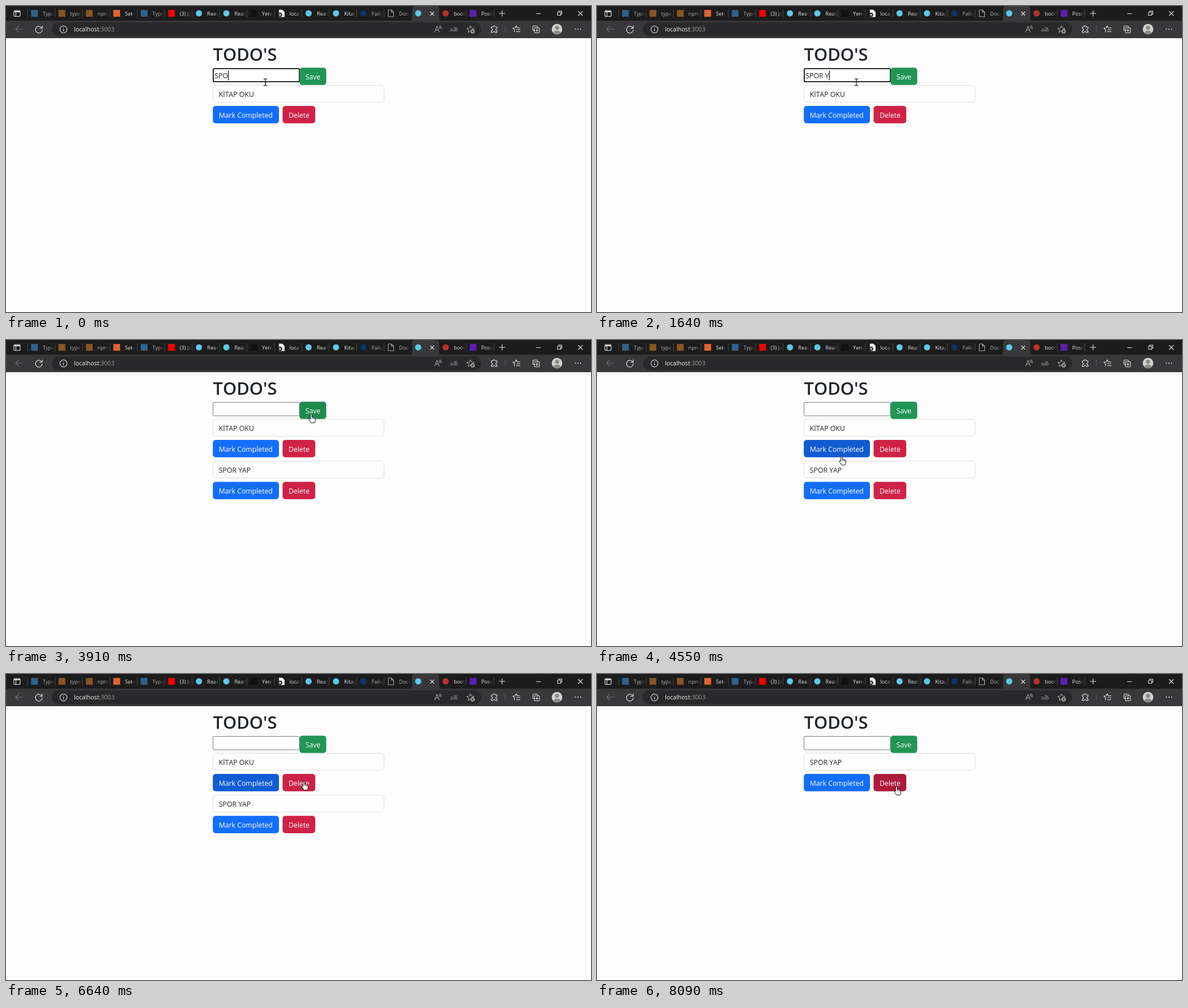
These frames come from a looping animation (1033x542 px, 8.18 s). An HTML page:

```html
<!DOCTYPE html>
<html lang="en">
<head>
<meta charset="utf-8">
<title>Todo list</title>
<style>
  html, body { margin: 0; width: 100%; height: 100%; overflow: hidden; background: #fdfdfd; }
  svg { display: block; }
  text { font: 12.25px "Open Sans", "Noto Sans", sans-serif; fill: #212529; white-space: pre; font-kerning: none; }
  .line { fill: none; stroke: #e4e4e4; stroke-width: 1.1; stroke-linecap: round; stroke-linejoin: round; }
  .dim { stroke: #a0a0a0; }
  .tab { font-size: 9.2px; fill: #e6e6e6; }
  .url { font-size: 10.6px; fill: #f2f2f2; }
  .title { font-size: 30.8px; font-weight: 600; }
  .label { fill: #fff; }
  .small { font-size: 9.5px; fill: #a0a0a0; }
</style>
</head>
<body>
<svg id="stage" width="1033" height="542" viewBox="0 0 1033 542">
  <defs>
    <linearGradient id="fade">
      <stop stop-color="#1c1c1c" stop-opacity="0"/>
      <stop offset="1" stop-color="#1c1c1c"/>
    </linearGradient>
    <clipPath id="round"><circle cx="973" cy="41" r="9.5"/></clipPath>
  </defs>
  <rect width="1033" height="542" fill="#fdfdfd"/>
  <rect width="1033" height="27" fill="#1c1c1c"/>
  <rect y="26" width="1033" height="31" fill="#38383a"/>
  <path d="M713 26q4 0 4-4V5q0-5 5-5h38q5 0 5 5v17q0 4 4 4z" fill="#38383a"/>
  <rect x="81" y="29" width="758" height="24.5" rx="12" fill="#29292b"/>
  <g id="tabs"></g>

  <!-- window frame -->
  <rect class="line" x="14" y="8" width="11" height="10.5" rx="2"/>
  <path class="line" d="M15 9.5h9M15 10.5h9M17.5 10v8"/>
  <path class="line" d="M749.5 10.5l6 6m0-6l-6 6M871 13h10m-5-5v10M936.5 13.5h7.5
    M974 11h5.500v5.500h-5.500zM976 11V9h5.500v5.500h-2M1010.500 9.500l7.500 7.500m0-7.500l-7.500 7.500"/>

  <!-- toolbar -->
  <path class="line" style="stroke:#707072" d="M29 41H17m5.500-5.500L17 41l5.500 5.500"/>
  <path class="line" d="M63.500 39.500a6 6 0 1 0 .5 2.500M64 35v4.500h-4.500"/>
  <circle class="line" cx="101.500" cy="41.500" r="6.200"/>
  <path class="line" d="M101.500 41v3.500m0-6.200v.2"/>
  <text class="url" x="120" y="45">localhost<tspan fill="#9b9b9b">:3003</tspan></text>
  <path class="line dim" d="M757 46l4-10 4 10m-6.500-3.500h5M764.500 36.500q2 1.500 1.500 4M766.500 35q2.500 2 2 5.500"/>
  <text class="small" x="784" y="44.500">a</text>
  <text class="small" x="789" y="44.500" style="font-family:'Noto Sans CJK JP','Noto Sans CJK',sans-serif">あ</text>
  <path class="line dim" id="star" d="M820 35l1.800 4 4.500.500-3.300 3 .8 4.300-3.800-2.200-3.900 2.200.9-4.300-3.400-3 4.500-.500z"/>
  <circle cx="824" cy="45" r="3.800" fill="#a0a0a0"/>
  <path d="M822 45h4m-2-2v4" stroke="#29292b"/>
  <path class="line" d="M857 37h3a2 2 0 0 1 4 0h3v3a2 2 0 0 0 0 4v3h-3a2 2 0 0 0-4 0h-3v-3a2 2 0 0 0 0-4z"/>
  <path d="M881.500 35v12" stroke="#5a5a5c"/>
  <path class="line" d="M897.500 46l.7-3.700-3.200-3 4.200-.500 1.800-3.800 1.800 3.800h5M902 42h5.500M901 45.500h6.500"/>
  <path class="line" d="M933 43.500h-1q-1.500 0-1.500-1.500v-5q0-1.500 1.500-1.500h5q1.500 0 1.500 1.500v1"/>
  <rect class="line" x="933" y="38.500" width="9" height="9" rx="1.500"/>
  <path class="line" d="M937.500 40.500v5m-2.500-2.500h5"/>
  <g clip-path="url(#round)">
    <circle cx="973" cy="41" r="9.500" fill="#d2d0ce"/>
    <circle cx="973" cy="38.500" r="3.600" fill="#8c8a88"/>
    <ellipse cx="973" cy="48.500" rx="6.500" ry="5" fill="#8c8a88"/>
  </g>
  <g fill="#e4e4e4"><circle cx="1005.500" cy="41" r="1"/><circle cx="1010" cy="41" r="1"/><circle cx="1014.500" cy="41" r="1"/></g>

  <text class="title" x="365.500" y="97">TODO'S</text>
  <g id="page"></g>
  <g id="cursor"></g>
</svg>
<script>
const LOOP = 8180;
const el = id => document.getElementById(id);

// Tab strip: label, icon colour, icon shape, sleeping
const tabs = [
  ['Type', '#2f608c', 'square', 1], ['type', '#8a5423', 'square', 1], ['npm', '#8a5423', 'square', 1],
  ['Set-', '#e0632f', 'square'], ['Type', '#2f608c', 'square', 1], ['(3) Ja', '#f40000', 'square'],
  ['Reac', '#5cc9e6', 'circle'], ['Reac', '#5cc9e6', 'circle'], ['Yeni', '#101210', 'square'],
  ['loca', '#f0f0f0', 'error'], ['Reac', '#5cc9e6', 'circle'], ['Kitap', '#5cc9e6', 'circle'],
  ['Failed', '#0d3468', 'circle', 1], ['Docu', '#a8a8a8', 'page', 1], ['', '#5cc9e6', 'circle'],
  ['boot', '#b8322c', 'circle'], ['Posit', '#5a1fae', 'square'],
];
const icons = {
  square: c => `<rect x="-6" y="-6" width="12" height="12" fill="${c}"/>`,
  circle: c => `<circle r="5.5" fill="${c}"/>`,
  page: c => `<path class="line" style="stroke:${c}" d="M-4.500-6h5.500l4 4v8h-9.500zM1-6v4h4"/>`,
  error: c => `<path fill="${c}" d="M-4-6.500h6l4 4v9h-10z"/><circle cx="-2" cy="2.500" r="3.800" fill="#1c1c1c"/>
    <path class="line" d="M-3.500 1l3 3m0-3l-3 3"/>`,
};
el('tabs').innerHTML = tabs.map(([label, color, shape, asleep], i) => {
  const x = 38.3 + 48.4 * i;
  const edge = i === 14 || i === 15 ? '' : `<path d="M${x} 6v14" stroke="#48484a"/>`;
  const text = label && `<svg x="${x + 26.5}" width="19" height="26">
    <text class="tab" y="16.500" opacity="${asleep ? 0.75 : 1}">${label}</text>
    <rect x="12" width="7" height="26" fill="url(#fade)"/></svg>`;
  return `${edge}<g transform="translate(${x + 12} 13)">${icons[shape](color)}</g>${text}`;
}).join('') + '<path d="M861.500 6v14" stroke="#48484a"/>';

// Timeline
const keys = [[0, 'SPO'], [450, 'SPOR'], [820, 'SPOR '], [1350, 'SPOR Y'], [1800, 'SPOR YA'], [2100, 'SPOR YAP']];
const SAVE = 3600, COMPLETE = 5100, UNDO = 6000, REMOVE = 7100;
const path = [
  [0, 458, 135], [2500, 458, 135], [2950, 542, 129], [3850, 542, 129], [4450, 432, 206], [4650, 432, 206],
  [4950, 435, 197], [6540, 435, 197], [6640, 526, 190], [7450, 526, 190], [7800, 529, 199], [LOOP, 529, 199],
];

function pointer(t) {
  t = Math.max(0, t);
  const i = Math.max(1, path.findIndex(p => p[0] >= t));
  const [t0, x0, y0] = path[i - 1], [t1, x1, y1] = path[i];
  const u = (t - t0) / (t1 - t0), e = u * u * (3 - 2 * u);
  return [x0 + (x1 - x0) * e, y0 + (y1 - y0) * e];
}
const inside = ([px, py], [x, y, w, h]) => px >= x && px <= x + w && py >= y && py <= y + h;

// Share of the recent past spent over a box, which eases the hover colour
function hover(box, t) {
  let hits = 0;
  for (let i = 0; i < 12; i++) hits += inside(pointer(t - 40 - i * 12.5), box);
  return hits / 12;
}
const mix = (a, b, u) => `rgb(${a.map((v, i) => Math.round(v + (b[i] - v) * u))})`;
const GREEN = [[34, 149, 86], [31, 138, 78]];
const BLUE = [[19, 110, 251], [16, 91, 208]];
const RED = [[207, 34, 70], [174, 27, 58]];

const pen = document.createElement('canvas').getContext('2d');
pen.font = '12.25px "Open Sans", "Noto Sans", sans-serif';
pen.fontKerning = 'none';

const cursors = {
  text: '<path d="M-3.500-6h2.500l1 1 1-1h2.500M0-5V5M-3.500 6h2.500l1-1 1 1h2.500" fill="none" stroke="#111" stroke-width="1.200"/>',
  hand: `<path d="M-1.300 1q0-1.200 1.300-1.200t1.300 1.200v4.500q1.300-.7 2.200.4 1.300-.5 2.100.6 1.700-.2 1.700 1.600v3.200
    q0 1.700-1.200 4.200h-6l-3.800-5.500q-.9-1.800.6-2.200.9-.1 1.800 1.200z" fill="#fff" stroke="#111" stroke-linejoin="round"/>
    <path d="M1.500 6v2.500M3.700 6.500v2.300M5.600 7v2" stroke="#111" stroke-width=".8"/>`,
  arrow: '<path d="M0 0v13l3-2.800 2 4.600 2-.9-2-4.500h4z" fill="#fff" stroke="#111" stroke-width=".9"/>',
};

function draw(t) {
  const targets = [];
  const button = (x, y, w, label, [base, over]) => {
    const box = [x, y, w, 30.7];
    targets.push(box);
    return `<rect x="${x}" y="${y}" width="${w}" height="30.700" rx="5" fill="${mix(base, over, hover(box, t))}"/>
      <text class="label" x="${x + 10.5}" y="${y + 20.7}">${label}</text>`;
  };
  const row = (y, label, done) => {
    const w = done ? 98.3 : 116.8;
    return `<rect x="365.500" y="${y + 0.3}" width="302" height="30" rx="5" fill="#fdfdfd" stroke="#dedede"/>
      <text x="375.800" y="${y + 20.6}">${label}</text>`
      + button(365.2, y + 37, w, done ? 'Uncompleted' : 'Mark Completed', BLUE)
      + button(371.6 + w, y + 37, 57.7, 'Delete', RED);
  };

  let html = '';
  if (t < SAVE) {
    const [since, typed] = keys.filter(k => k[0] <= t).pop();
    html += `<rect x="366" y="110.800" width="152" height="23.400" rx="2" fill="#fff" stroke="#101010" stroke-width="1.800"/>
      <text x="368.300" y="127.600">${typed}</text>`;
    if ((t - since) % 1000 < 500) {
      const x = 369 + pen.measureText(typed).width;
      html += `<path d="M${x} 114.500v17" stroke="#000" stroke-width="1.200"/>`;
    }
  } else {
    html += '<rect x="365.500" y="110.500" width="152.500" height="23.700" rx="1.500" fill="#fff" stroke="#7c7c74"/>';
  }
  html += button(518.2, 109.2, 47.3, 'Save', GREEN);

  const items = [];
  if (t < REMOVE) items.push(['KİTAP OKU', t >= COMPLETE && t < UNDO]);
  if (t >= SAVE) items.push(['SPOR YAP', false]);
  html += items.map(([label, done], i) => row(140 + 74.2 * i, label, done)).join('');
  el('page').innerHTML = html;

  const at = pointer(t);
  const kind = targets.some(box => inside(at, box)) ? 'hand'
    : inside(at, [365, 110, 153, 25]) || inside(at, [376, 148, 62, 16]) ? 'text' : 'arrow';
  el('cursor').innerHTML = cursors[kind];
  el('cursor').setAttribute('transform', `translate(${at})`);
}

function tick() {
  draw(performance.now() % LOOP);
  requestAnimationFrame(tick);
}
tick();
</script>
</body>
</html>
```
